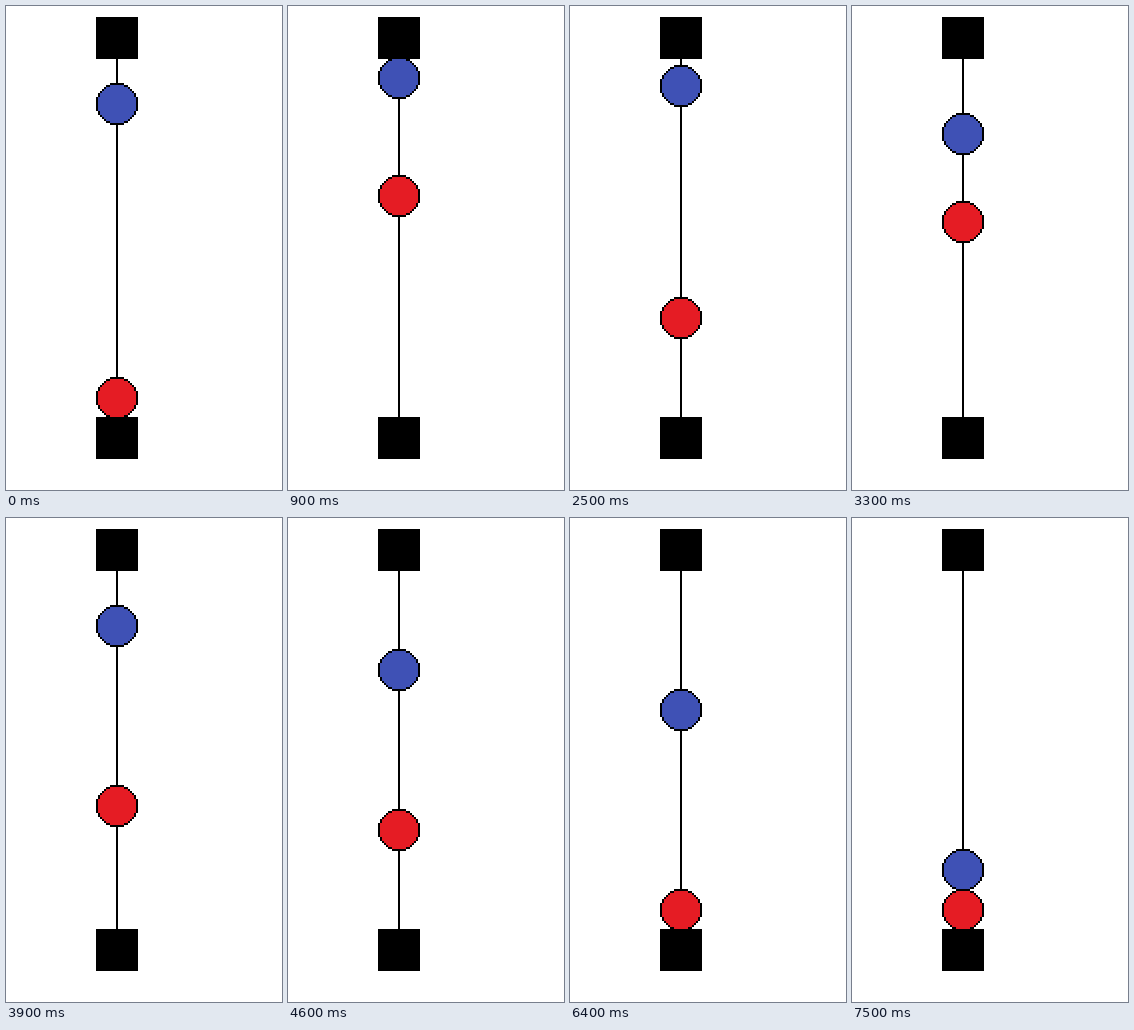
A matplotlib script that plays this animation: 276 px wide and 484 px high, repeating every 8100 ms.

```python
import numpy as np
import matplotlib.pyplot as plt
from matplotlib.animation import FuncAnimation

W, H, DPI = 276, 484, 100
FRAMES, INTERVAL = 81, 100
SCALE, CELLS = 2, 21              # chunky pixels, ball and block width in cells
SIZE = SCALE * CELLS
LEFT, BLOCK_TOPS = 90, (11, 411)
CEILING, FLOOR, GAP = 72, 392, SIZE
BLACK, BLUE, RED = (0, 0, 0), (63, 81, 181), (229, 28, 36)

# Red shuttles between the floor and blue; blue drifts until it is hit again
HITS = {7: CEILING, 20.5: 93, 32: 131, 41.7: 98, 54: 102}
FLOOR_TIMES = (0, 14.3, 27, 37.1, 48, 60)
CEILING_TIMES = (10, 28, 51.8)
DRIFT = {0: 98, 46: 152, 64: 192, 68: FLOOR - GAP + SCALE}

BLUE_PATH = sorted({**HITS, **DRIFT, **dict.fromkeys(CEILING_TIMES, CEILING)}.items())
RED_PATH = sorted([(t, FLOOR) for t in FLOOR_TIMES] +
                  [(t, y + GAP) for t, y in HITS.items()])


def enlarge(mask):
    return np.kron(mask, np.ones((SCALE, SCALE), int)).astype(bool)


def ball_masks():
    r = np.arange(CELLS) - CELLS // 2
    disc = r[:, None] ** 2 + r ** 2 <= (CELLS / 2) ** 2
    p = np.pad(disc, 1)
    inner = disc & p[:-2, 1:-1] & p[2:, 1:-1] & p[1:-1, :-2] & p[1:-1, 2:]
    return enlarge(disc), enlarge(inner)


DISC, INNER = ball_masks()


def centre(path, frame):
    times, ys = zip(*path)
    return SCALE * int(round(np.interp(frame, times, ys) / SCALE))


def draw_ball(img, y, color):
    top = y - SIZE // 2
    area = img[top:top + SIZE, LEFT:LEFT + SIZE]
    area[DISC] = BLACK
    area[INNER] = color


def draw_scene(frame):
    img = np.full((H, W, 3), 255, np.uint8)
    mid = LEFT + SIZE // 2
    img[BLOCK_TOPS[0]:BLOCK_TOPS[1], mid - 1:mid + 1] = BLACK
    draw_ball(img, centre(BLUE_PATH, frame), BLUE)
    draw_ball(img, centre(RED_PATH, frame), RED)
    for top in BLOCK_TOPS:
        img[top:top + SIZE, LEFT:LEFT + SIZE] = BLACK
    return img


fig = plt.figure(figsize=(W / DPI, H / DPI), dpi=DPI, facecolor="white")
ax = fig.add_axes([0, 0, 1, 1])
ax.axis("off")
stage = ax.imshow(draw_scene(0), interpolation="nearest", aspect="auto")


def update(frame):
    stage.set_data(draw_scene(frame))
    return [stage]


anim = FuncAnimation(fig, update, frames=FRAMES, interval=INTERVAL,
                     repeat=True, repeat_delay=0, blit=False)
plt.show()
```
